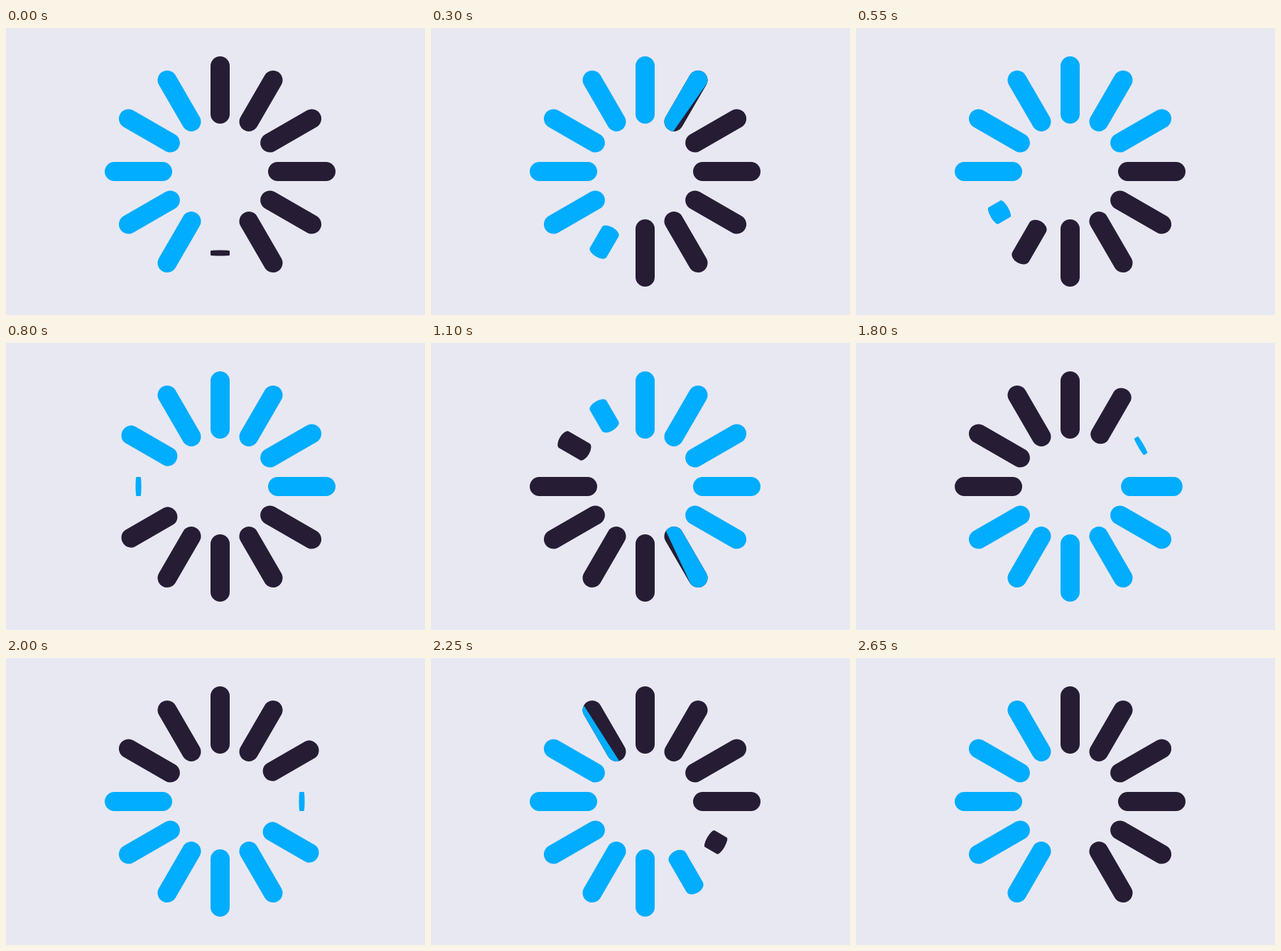
An HTML page with a canvas for the animation above (2.7 s loop, 590 by 405 pixels).

```html
<!DOCTYPE html>
<html lang="en">
<head>
<meta charset="utf-8">
<title>Spinner</title>
<style>
  html, body { margin: 0; width: 100%; height: 100%; overflow: hidden; background: #e8e8f2; }
  canvas { display: block; }
</style>
</head>
<body>
<canvas id="stage" width="590" height="405"></canvas>
<script>
const ctx = document.getElementById('stage').getContext('2d');
const LOOP = 2700, STEP = 50;
const CX = 301.5, CY = 202.5;
const BAR = { radius: 115, length: 95, width: 27 };
const DARK = '#261d35', BLUE = '#00adff', BACK = '#e8e8f2';
const MARGIN = 10; // degrees that a bar reaches to each side of its axis
const rad = deg => deg * Math.PI / 180;

// Clock position 6 flips last; 7 flips first.
const flipTime = hour => 400 + ((hour + 5) % 12) * 200;
const sweepAngle = t => Math.min(350, -MARGIN + 0.15 * t);
const flipScale = dt => Math.min(1, 0.085 + 0.00413 * Math.abs(dt));

function barScale(hour, t) {
  const flip = flipTime(hour);
  if (hour !== 6) return flipScale(t - flip);
  if (t > flip) return 0;
  return Math.min(flipScale(t), flipScale(t - flip));
}

function drawBar(hour, scale, color) {
  ctx.save();
  ctx.translate(CX, CY);
  ctx.rotate(rad(hour * 30));
  ctx.translate(0, -BAR.radius);
  ctx.scale(1, scale);
  ctx.beginPath();
  ctx.roundRect(-BAR.width / 2, -BAR.length / 2, BAR.width, BAR.length, BAR.width / 2);
  ctx.fillStyle = color;
  ctx.fill();
  ctx.restore();
}

function clipSweep(angle) {
  ctx.beginPath();
  ctx.moveTo(CX, CY);
  ctx.arc(CX, CY, 200, rad(-90 - MARGIN), rad(angle - 90));
  ctx.closePath();
  ctx.clip();
}

function paintBar(hour, t) {
  const scale = barScale(hour, t);
  if (!scale) return;
  const flipped = t > flipTime(hour);
  const startsBlue = hour > 6;
  if (startsBlue !== flipped) {
    // Right half after its flip is dark, left half before its flip is blue.
    if (!startsBlue || !flipped) return drawBar(hour, scale, startsBlue ? BLUE : DARK);
  }
  const sweep = sweepAngle(t), angle = hour * 30;
  if (sweep >= angle + MARGIN) return drawBar(hour, scale, BLUE);
  drawBar(hour, scale, DARK);
  if (sweep > angle - MARGIN) {
    ctx.save();
    clipSweep(sweep);
    drawBar(hour, scale, BLUE);
    ctx.restore();
  }
}

function render(now) {
  const t = Math.floor((now % LOOP) / STEP) * STEP;
  ctx.fillStyle = BACK;
  ctx.fillRect(0, 0, 590, 405);
  for (let hour = 0; hour < 12; hour++) paintBar(hour, t);
}

let start;
function tick(now) {
  start ??= now;
  render(now - start);
  requestAnimationFrame(tick);
}
render(0);
requestAnimationFrame(tick);
</script>
</body>
</html>
```
